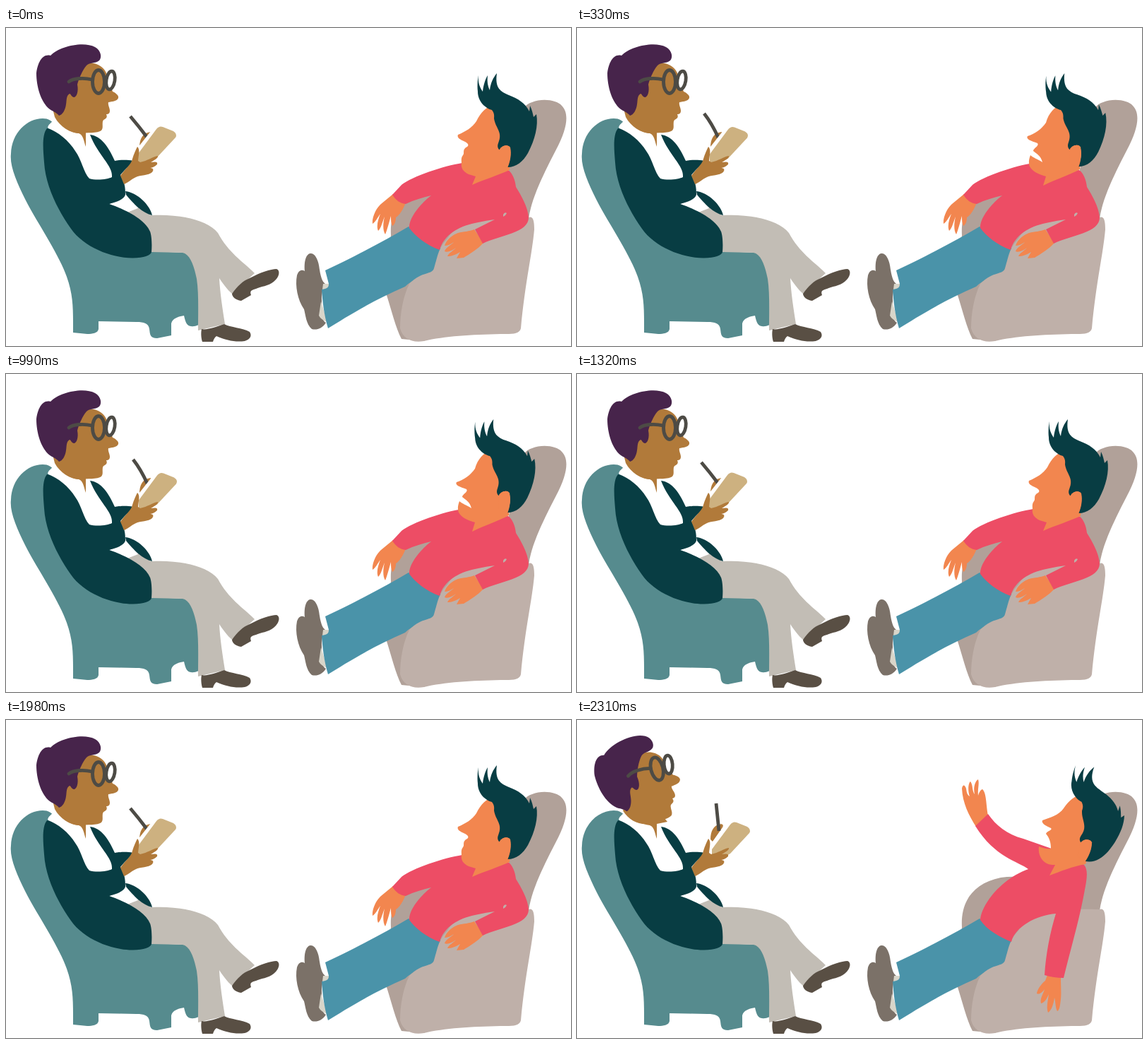
An HTML page that plays this animation: 800 px wide and 450 px high, repeating every 3.31 s.

```html
<!DOCTYPE html>
<html lang="en">
<head>
<meta charset="utf-8">
<title>Counselling session</title>
<style>
html, body { margin: 0; width: 100%; height: 100%; overflow: hidden; background: #fff; }
svg { display: block; width: 100%; height: 100%; }
.pose { display: none; }
[data-pose=calm] .calm, [data-pose=talk] .talk, [data-pose=shout] .shout { display: inline; }
.teal { fill: #568b8e; } .dark { fill: #083d43; } .brown { fill: #b17a3a; }
.grey { fill: #c2bdb5; } .shoe { fill: #594f44; } .plum { fill: #47244b; }
.back { fill: #b1a199; } .front { fill: #bfb0a9; } .pink { fill: #ed4d65; }
.peach { fill: #f2864f; } .blue { fill: #4a93a9; } .sole { fill: #7b7168; }
.line { fill: none; stroke: #4d4b45; stroke-width: 4.8; stroke-linecap: round; }
</style>
</head>
<body>
<svg id="scene" viewBox="0 0 800 450" data-pose="calm">
  <!-- counsellor: chair, legs, jacket -->
  <path class="teal" d="M7 178C8 148 30 128 52 128C60 128 66 131 70 140L205 316L255 318L283 350V415L273 420Q266 423 262 422C255 421 254 415 252 407C246 408 236 410 234 418V435L214 439C204 439 204 434 203 426C202 418 195 416 185 416L131 415V426C130 432 122 433 115 433L95 431C95 400 96 380 86 352C75 320 42 272 28 244C15 218 5 195 7 178Z"/>
  <path class="grey" d="M169 262L187 254C195 258 201 264 207 265C240 263 285 270 300 290C315 318 335 330 352 347L320 376C313 370 306 360 302 354C303 375 307 400 310 419L272 428C272 400 273 375 270 355C266 335 260 320 250 318L206 317L190 280Z"/>
  <path class="shoe" d="M320 376C328 365 335 358 345 354C360 346 375 341 383 341C389 343 387 353 379 359C372 365 360 366 354 369C347 371 345 372 347 378L333 386C325 385 320 380 320 376ZM277 426C284 428 300 422 309 419C318 424 335 424 345 430C349 436 345 441 338 443C325 445 312 442 298 436C295 438 294 441 293 444L278 444C276 438 276 430 277 426Z"/>
  <path fill="#fff" d="M146 249L170 236L187 255L169 262Z"/>
  <path class="dark" d="M58 142C50 152 53 175 54 190C56 225 75 260 92 284C110 310 150 326 180 325.500C195 325 205 322 206 317C207 305 206 293 204 288C198 273 175 259 146 249C158 246 167 242 169 236C169 225 168 218 162 208C170 198 178 193 180 188C170 186 160 187 154 188C145 168 135 153 119 151ZM169 231C183 232 203 248 207 265C195 262 185 254 170 236Z"/>
  <path fill="#fff" d="M66 132C60 137 58 140 60 142C73 147 89 159 98 174C107 186 110 205 118 213C128 216 145 214 150 211C152 195 130 180 119 151L112 147Z"/>
  <path class="brown" d="M67 118L69 126C76 140 92 148 103 149C110 152 110 160 113 168L113 147L128 144L100 110Z"/>

  <g id="counsellorHead">
    <path class="brown" d="M100 60L115 50C125 48 135 53 140 60C146 70 148 82 151 90C156 92 160 96 159 99C157 104 150 104 145 105C144 109 147 113 147 117C147 121 145 122 142 122C145 129 138 128 137 132C136 138 138 141 135 145C130 149 115 148 103 149C88 148 75 138 70 122L85 95Z"/>
    <path class="plum" d="M63 39C75 26 110 18 126 27C135 32 136 42 132 46C126 51 119 48 114 53C108 60 103 72 101 80C103 90 100 98 96 98C92 97 92 93 90 93C85 96 86 102 85 108C84 116 80 123 75 124C71 119 66 118 62 115C49 105 43 82 43 64C45 48 52 36 63 39Z"/>
    <g class="line">
      <path d="M89 76C95 71 110 70 122 73M140 77C141 73 143 72 145 74"/>
      <ellipse cx="131" cy="76" rx="8.500" ry="16.500"/>
      <ellipse cx="148" cy="74" rx="6" ry="13" transform="rotate(9 148 74)" fill="#fff"/>
    </g>
  </g>

  <!-- notepad, pencil and writing hand -->
  <path class="brown" d="M189 169C189 157 194 149 201 148C206 146 208 149 206 152L192 172Z"/>
  <path class="line" id="pencil" style="stroke-linecap:butt"/>
  <g id="pad">
    <path fill="#fff" d="M180 188L186 170L209 141L216 139L190 182Z"/>
    <path fill="#cdb180" d="M187 190V178L213 143Q217 138 222 140L237 146Q243 150 240 155L213 184L203 190Z"/>
  </g>
  <path class="brown" d="M162 209C170 198 178 192 179 185C181 178 184 172 186 168C190 172 188 178 187 188L190 190C200 188 208 182 215 181C216 184 208 188 205 190C212 189 215 189 214 193C210 197 206 198 203 198C208 198 210 200 207 204C202 209 190 208 184 211C176 215 171 220 167 221Z"/>

  <!-- client: chair and legs -->
  <path class="back" d="M740 270C744 240 762 205 779 172C796 140 797 120 787 110C780 102 760 99 745 105C735 108 731 115 728 125L712 200V270ZM545 293C543 258 560 231 600 223C620 220 640 222 650 230L640 400L592 443L560 440C552 425 546 400 538 375Z"/>
  <path class="sole" d="M431 319C438 318 443 330 444 342C446 355 449 360 452 362C446 375 447 380 447 388C448 395 444 412 453 417C448 425 440 428 433 426C425 420 424 405 422 398C413 385 409 365 412 350C414 343 419 341 423 344C422 332 424 320 431 319Z"/>
  <path fill="#d8d5c9" d="M449 362H458V370H448ZM446 387L455 416Q446 413 443 407Z"/>
  <path class="blue" d="M570 281L616 312C610 340 607 343 603 345C590 352 575 356 565 366C520 385 480 410 456 425C450 405 448 385 447 370C455 369 457 367 457 362L452 343C480 330 530 305 570 281Z"/>
  <path class="front" d="M571 362C590 343 603 350 606 340C612 320 612 312 625 298C640 272 670 266 740 268C747 265 748 275 748 285C745 320 735 360 729 425C727 434 715 433 700 433C660 434 620 436 592 443C575 446 562 440 558 425C558 405 562 380 571 362Z"/>

  <!-- client: resting arms -->
  <g class="pose calm talk">
    <path class="peach" d="M548 235L566 247C562 258 556 266 552 268C552 274 550 279 547 280C545 276 545 272 545 266C543 273 540 285 537 292C533 286 534 275 536 267C533 274 531 284 527 287C524 280 527 271 530 263C526 268 524 274 519 277C518 268 524 255 531 249ZM663 285L676 304C668 313 656 320 648 325L638 326C640 322 642 319 643 317C636 321 631 323 625 323C627 318 634 315 637 311C632 315 625 318 621 316C622 311 632 306 634 303C630 306 625 308 621 308C624 299 632 293 640 290C648 288 656 288 663 285Z"/>
    <path class="pink" d="M646 191C620 195 575 210 560 222L547 236C552 244 558 248 566 249C578 243 590 240 602 237C585 250 570 270 571 283C580 295 595 307 614 314C620 293 640 281 664 276Q682 272 692 271L664 285L675 305C700 293 740 290 740 268C738 250 728 235 722 225C721 215 717 205 711 201L660 205Z"/>
    <path class="front" d="M704 264Q706 260 709 262Q708 265 704 267Z"/>
  </g>

  <!-- client: raised arm -->
  <g class="pose shout">
    <path class="peach" d="M565 151C555 135 546 118 545 97C546 91 549 91 551 97C552 104 553 106 556 108C553 100 554 89 557 87C561 92 559 100 563 105C561 97 563 87 568 84C570 90 567 98 568 107C569 103 571 99 574 98C580 103 579 120 582 135ZM666 361L685 363C685 375 686 388 685 395C684 405 683 411 680 412C677 406 678 400 676 393C675 401 672 411 667 414C664 406 667 397 668 388C665 395 662 400 657 401C655 395 660 388 662 381C659 385 655 389 651 387C652 380 659 372 663 369Z"/>
    <path class="pink" d="M564 150L582 133C593 149 609 162 632 168L672 182L718 205C724 212 722 225 719 240C712 280 700 320 689 365Q675 365 662 361C664 330 670 300 678 274C650 276 620 293 615 314C600 308 580 297 571 283C572 262 600 225 639 211C625 200 592 195 564 150Z"/>
  </g>

  <!-- client: faces -->
  <path class="peach pose calm" d="M692 110C680 110 672 120 666 132C660 141 650 147 640 151C638 155 643 158 650 161C654 163 656 166 653 168C645 172 650 177 647 180C644 184 645 187 645 191C644 198 647 203 655 207L665 210L660 222C678 214 698 208 713 201L716 170Z"/>
  <path class="peach pose talk" d="M686 108C676 112 668 120 664 134C658 143 648 150 638 153C635 157 643 160 652 163C655 167 646 170 646 174C651 178 657 181 659 190C652 185 646 184 642 180C640 185 639 191 641 196C645 203 653 207 664 210L660 223C678 214 697 208 712 200L714 170Z"/>
  <path class="peach pose shout" d="M718 105C706 106 697 113 689 125C682 135 670 138 659 142C657 146 664 150 671 153C674 156 665 157 664 161C669 167 671 173 671 182C665 183 660 181 654 179C653 187 655 195 662 201C667 205 672 205 677 205L669 220C685 214 702 207 720 204L730 175Z"/>
  <g id="clientHair">
    <path class="dark" d="M669 67C668 78 671 84 675 90C676 80 679 72 682 67C681 76 682 82 685 88C686 78 690 70 695 64C692 85 700 90 712 95C725 100 735 106 741 118L742 110C745 116 746 122 747 126L751 122C754 138 749 158 739 177C732 189 723 197 710 197C714 188 716 176 713 168C708 164 700 168 700 173C697 172 695 168 697 163C704 147 693 142 691 128C692 120 689 118 688 116C680 114 668 105 668 90C667 80 668 72 669 67Z"/>
    <path class="peach" d="M698 174C700 166 711 164 714 169C716 178 714 189 710 198L698 192Z"/>
  </g>
</svg>
<script>
const byId = id => document.getElementById(id);
const scene = byId('scene');
const LOOP = 3310, BEAT = 330, SHOUT_AT = 2310;

const poses = {
  calm: { head: '', hair: '', pad: '', pencil: 'M176 125Q188 139 200 155' },
  talk: { head: '', hair: 'rotate(-2 690 200)', pad: 'translate(1 .5)', pencil: 'M180 121Q191 135 200 155' },
  shout: {
    head: 'rotate(-14 94 145)',
    hair: 'translate(20 -11) rotate(12 639 153)',
    pad: 'translate(4 5)',
    pencil: 'M197 118Q199 137 201 157'
  }
};

function show(name) {
  const pose = poses[name];
  scene.dataset.pose = name;
  byId('counsellorHead').setAttribute('transform', pose.head);
  byId('clientHair').setAttribute('transform', pose.hair);
  byId('pad').setAttribute('transform', pose.pad);
  byId('pencil').setAttribute('d', pose.pencil);
}

const start = performance.now();
function frame() {
  const t = (performance.now() - start) % LOOP;
  show(t >= SHOUT_AT ? 'shout' : Math.floor(t / BEAT) % 2 ? 'talk' : 'calm');
  requestAnimationFrame(frame);
}
frame();
</script>
</body>
</html>
```
